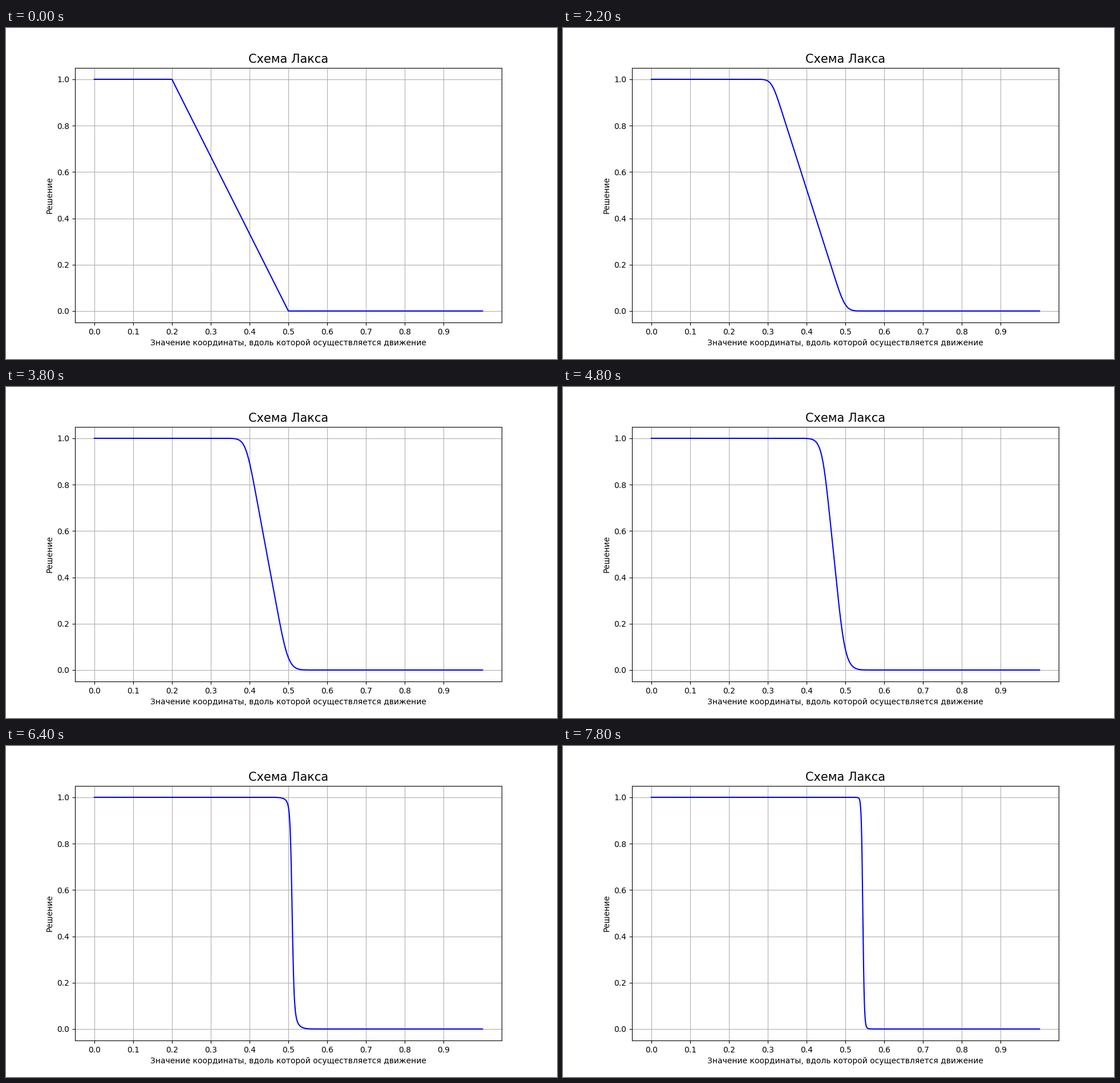
Write a matplotlib script that moves like this. It is 966 px wide and 580 px high and loops after 8 s.

```python
import numpy as np
import matplotlib.pyplot as plt
from matplotlib.animation import FuncAnimation

plt.rcParams["font.family"] = "DejaVu Sans"

FRAMES, INTERVAL = 40, 200
DX, DT = 0.001, 0.0005
STEPS_PER_FRAME = 20

x = np.linspace(0, 1, 1001)


def lax_step(u):
    """One Lax-Friedrichs step of u_t + (u^2 / 2)_x = 0 with fixed ends."""
    flux = u * u / 2
    new = u.copy()
    new[1:-1] = (u[2:] + u[:-2]) / 2 - DT / (2 * DX) * (flux[2:] - flux[:-2])
    return new


def solve():
    u = np.interp(x, [0.2, 0.5], [1.0, 0.0])
    states = [u]
    for _ in range(FRAMES - 1):
        for _ in range(STEPS_PER_FRAME):
            u = lax_step(u)
        states.append(u)
    return states


states = solve()

fig, ax = plt.subplots(figsize=(9.66, 5.8), dpi=100)
line, = ax.plot(x, states[0], color="blue", linewidth=1.5)
ax.set_xlim(-0.05, 1.05)
ax.set_ylim(-0.05, 1.05)
ax.set_xticks(np.arange(0, 1, 0.1))
ax.grid(True)
ax.set_title("Схема Лакса", fontsize=15)
ax.set_xlabel("Значение координаты, вдоль которой осуществляется движение")
ax.set_ylabel("Решение")


def update(i):
    line.set_ydata(states[i])
    return line,


anim = FuncAnimation(fig, update, frames=FRAMES, interval=INTERVAL,
                     repeat=True, repeat_delay=0)
plt.show()
```
